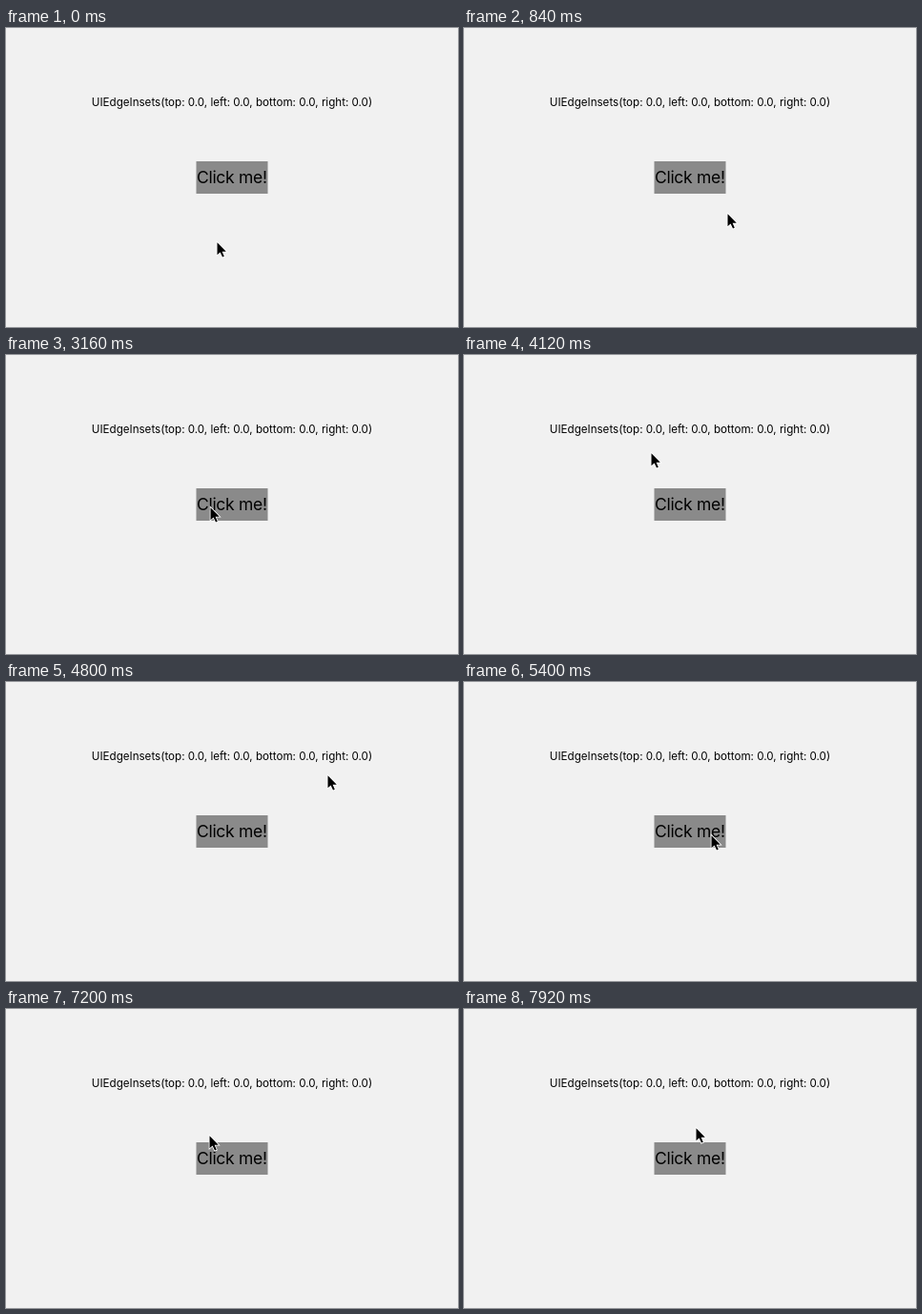
Recreate the animation shown at these times as an HTML page. Size 474x314 px, loop 8 s.

```html
<!DOCTYPE html>
<html lang="en">
<head>
<meta charset="utf-8">
<title>Click me!</title>
<style>
  html, body { margin: 0; width: 100%; height: 100%; overflow: hidden; background: #f1f1f1; }
  svg { display: block; width: 474px; height: 314px; }
  text { font-family: Inter, "Liberation Sans", sans-serif; text-anchor: middle; }
</style>
</head>
<body>
<svg viewBox="0 0 474 314">
  <rect width="474" height="314" fill="#f1f1f1"/>
  <text x="237" y="81.5" font-size="11.6">UIEdgeInsets(top: 0.0, left: 0.0, bottom: 0.0, right: 0.0)</text>
  <rect x="199.5" y="140" width="75" height="34" fill="#8a8a8a"/>
  <text x="236.8" y="163" font-size="17.5" letter-spacing="-.3">Click me!</text>
  <path id="cursor" d="M.5 1.2V14.2L3.6 11.4L6 16.6L7.8 15.8L5.6 10.7H9.8Z"
        stroke="#fff" stroke-width="1.6" paint-order="stroke"/>
</svg>
<script>
const LOOP = 8000, STEP = 40;

// The pointer eases from rest to rest; bow bends the way sideways, most at half time.
const home = [221, 224];
const moves = [
  { start: 0, end: 840, to: [276, 194], bow: [36, -40] },
  { start: 1200, end: 1480, to: [241, 164], bow: [0, 0] },
  { start: 1760, end: 2320, to: [222, 165], bow: [-15, 3] },
  { start: 2480, end: 3160, to: [214, 159], bow: [-70, 18] },
  { start: 3160, end: 3240, to: [236, 154], bow: [0, 0] },
  { start: 3520, end: 4120, to: [196, 102], bow: [-40, -44] },
  { start: 4400, end: 5160, to: [200, 138], bow: [140, -25] },
  { start: 5240, end: 5600, to: [271, 189], bow: [30, 1] },
  { start: 5720, end: 6560, to: [190, 160], bow: [-55, -18] },
  { start: 6640, end: 7200, to: [213, 132], bow: [-56, -34] },
  { start: 7200, end: 7480, to: [215, 145], bow: [18, 5] },
  { start: 7520, end: 7920, to: [243, 124], bow: [10, 35] }
];

function pointerAt(time) {
  const index = moves.findLastIndex(move => move.start <= time);
  const { start, end, to, bow } = moves[index];
  const from = index ? moves[index - 1].to : home;
  const u = Math.min(1, (time - start) / (end - start));
  const ease = u * u * (3 - 2 * u);
  const bend = Math.sin(Math.PI * u) ** 2;
  return from.map((value, axis) =>
    Math.round(value + (to[axis] - value) * ease + bow[axis] * bend));
}

const cursor = document.getElementById("cursor");
const origin = performance.now();

function draw() {
  const elapsed = (performance.now() - origin) % LOOP;
  const [x, y] = pointerAt(Math.floor(elapsed / STEP) * STEP);
  cursor.setAttribute("transform", `translate(${x} ${y})`);
  requestAnimationFrame(draw);
}
draw();
</script>
</body>
</html>
```
